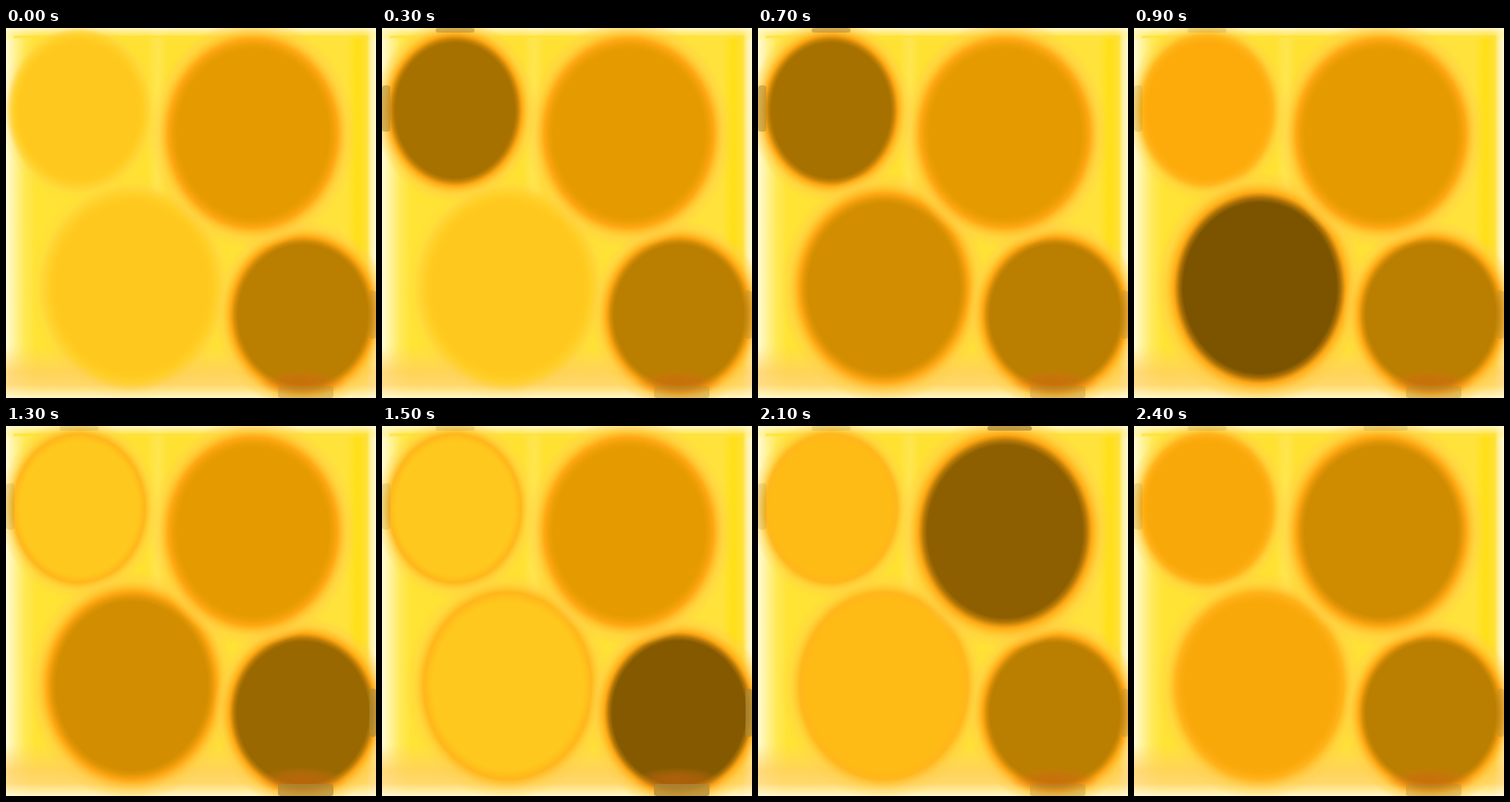
An HTML page with a canvas that plays this animation: 400 by 400 pixels, repeating every 2500 ms.

```html
<!DOCTYPE html>
<html lang="en">
<head>
<meta charset="utf-8">
<title>Glowing discs</title>
<style>
  html, body { margin: 0; width: 100%; height: 100%; overflow: hidden; background: #ffe238; }
  canvas { display: block; width: 100vw; height: 100vh; }
</style>
</head>
<body>
<canvas id="stage" width="400" height="400"></canvas>
<script>
const ctx = document.getElementById('stage').getContext('2d');
const LOOP = 2500, STEP = 100, FADE = 500;

// A dark pulse walks round the discs, one every 500 ms.
// tone: resting brightness, depth: how much the pulse takes away.
const discs = [
  { x: 79, y: 89, rx: 69, ry: 78, tone: 200, depth: 145, smudges: [[0, 62, 9, 50], [58, 0, 42, 5]] },
  { x: 136, y: 281, rx: 88, ry: 98, tone: 200, depth: 145, smudges: [] },
  { x: 321, y: 310, rx: 76, ry: 82, tone: 126, depth: 37, smudges: [[393, 284, 7, 52], [294, 387, 60, 13]] },
  { x: 267, y: 114, rx: 89, ry: 99, tone: 155, depth: 75, smudges: [[248, 0, 48, 5]] }
];
discs.forEach((d, i) => d.peak = (i + 1) * FADE);

const clamp = v => Math.min(1, Math.max(0, v));
const mix = (a, b, k) => a + (b - a) * k;
const blend = (a, b, k) => a.map((v, i) => mix(v, b[i], k));
const css = (c, a = 1) => `rgba(${c.map(Math.round)},${a})`;

// Amber ramp from brown to yellow, led by its green part.
const amber = g => [Math.min(255, g * 1.48), g, Math.max(0, (g - 155) * 0.66)];

function band(x1, y1, stops) {
  const g = ctx.createLinearGradient(0, 0, x1, y1);
  for (const [p, c] of stops) g.addColorStop(p, c);
  ctx.fillStyle = g;
  ctx.fillRect(0, 0, 400, 400);
}

function glow(x, y, rx, ry, reach, stops) {
  ctx.save();
  ctx.translate(x, y);
  ctx.scale(rx, ry);
  const g = ctx.createRadialGradient(0, 0, 0, 0, 0, reach);
  for (const [r, c] of stops) g.addColorStop(r / reach, c);
  ctx.fillStyle = g;
  ctx.beginPath();
  ctx.arc(0, 0, reach, 0, Math.PI * 2);
  ctx.fill();
  ctx.restore();
}

function backdrop() {
  band(400, 0, [
    [0, '#fffad8'], [0.02, '#fff4a0'], [0.05, '#ffe957'], [0.08, '#ffe335'],
    [0.38, '#ffe132'], [0.41, '#ffe650'], [0.44, '#ffe132'], [0.92, '#ffe33c'],
    [0.95, '#ffdf16'], [0.975, '#ffe038'], [0.985, '#fff09a'], [1, '#fff9d8']
  ]);
  band(0, 400, [
    [0, 'rgba(255,249,215,.9)'], [0.018, 'rgba(255,240,150,.5)'],
    [0.035, 'rgba(255,230,70,0)'], [0.86, 'rgba(255,210,100,0)'],
    [0.93, 'rgba(255,207,100,.75)'], [0.965, 'rgba(255,214,120,.8)'],
    [0.985, 'rgba(255,236,175,.85)'], [1, 'rgba(255,247,215,.9)']
  ]);
  ctx.fillStyle = 'rgba(255,225,45,.6)';
  ctx.fillRect(8, 8, 384, 3);
}

function pose(d, t) {
  const pulse = clamp(1 - Math.abs(t - d.peak) / FADE);
  const dusk = clamp((t - 1900) / FADE);
  const tone = Math.min(d.tone - d.depth * pulse, 200 - 32 * dusk);
  const passed = t > d.peak;
  return {
    fill: amber(tone),
    grow: 1 + 0.03 * pulse,
    rim: Math.max(clamp((200 - tone) / 45), passed ? 0.65 : 0),
    smudge: Math.max(clamp((150 - tone) / 50), passed ? 0.3 : 0)
  };
}

function drawDisc(d, { fill, grow, rim }) {
  const edge = [255, mix(207, 165, rim), mix(38, 18, rim)];
  const halo = [255, 205, 70];
  glow(d.x, d.y, d.rx * grow, d.ry * grow, 1.26, [
    [0, css(fill)], [0.92, css(fill)], [0.97, css(blend(fill, edge, 0.35))],
    [1.03, css(edge, 0.95)], [1.08, css(blend(edge, halo, 0.4), 0.7)],
    [1.15, css(halo, 0.15 + 0.35 * rim)], [1.26, css(halo, 0)]
  ]);
}

function drawSmudges(d, { smudge }) {
  ctx.fillStyle = `rgba(172,138,58,${0.75 * smudge})`;
  for (const box of d.smudges) {
    ctx.beginPath();
    ctx.roundRect(...box, 3);
    ctx.fill();
  }
}

function draw(t) {
  const poses = discs.map(d => pose(d, t));
  backdrop();
  discs.forEach((d, i) => drawDisc(d, poses[i]));
  glow(320, 383, 48, 14, 1, [
    [0, 'rgba(208,100,20,.55)'], [0.5, 'rgba(212,105,22,.4)'], [1, 'rgba(220,120,30,0)']
  ]);
  discs.forEach((d, i) => drawSmudges(d, poses[i]));
}

const start = performance.now();
function tick() {
  const t = (performance.now() - start) % LOOP;
  draw(Math.floor(t / STEP) * STEP);
  requestAnimationFrame(tick);
}
tick();
</script>
</body>
</html>
```
